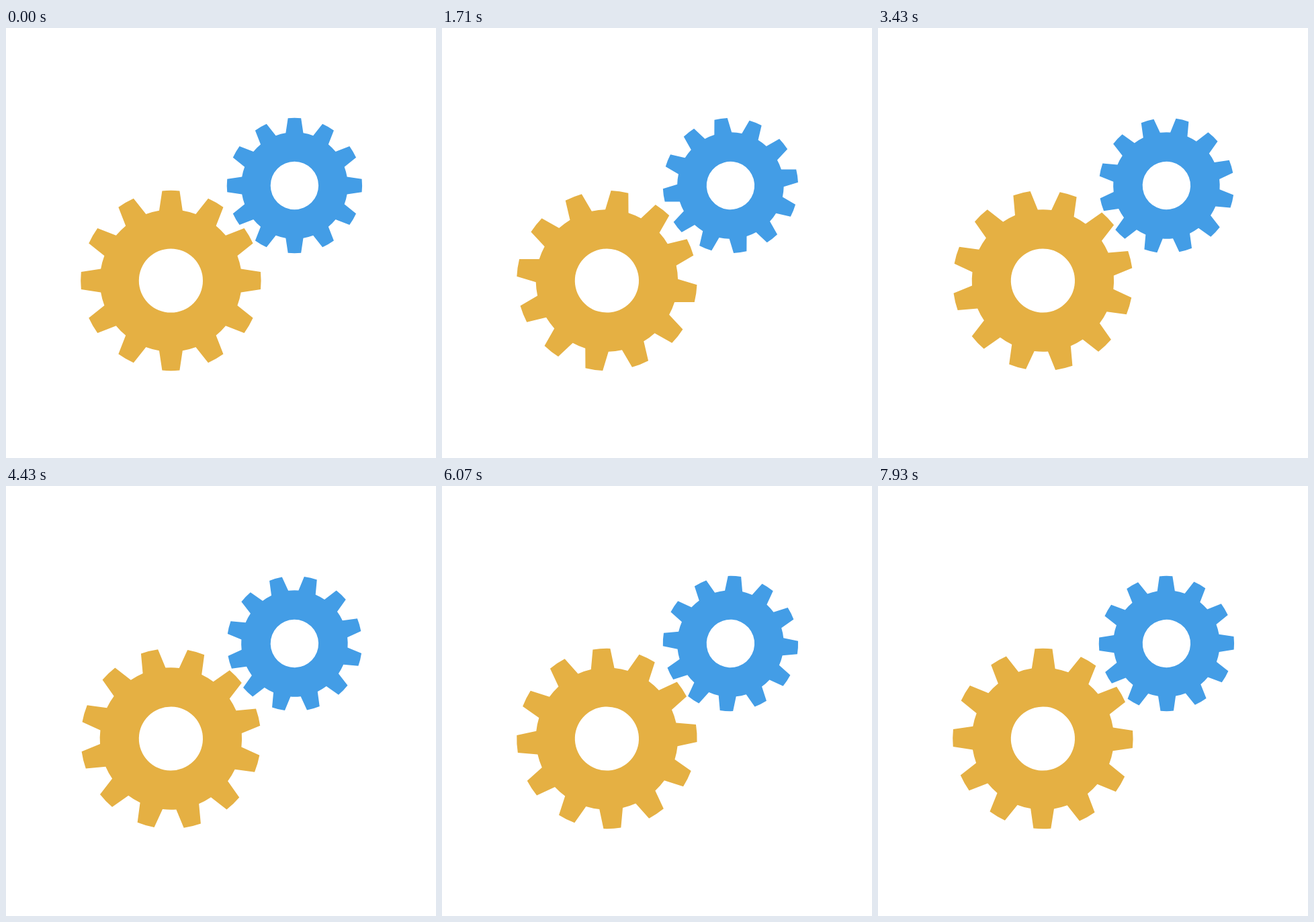
An HTML page with a canvas that plays this animation: 640 by 640 pixels, repeating every 8000 ms.

```html
<!DOCTYPE html>
<html lang="en">
<head>
<meta charset="utf-8">
<title>Gears</title>
<style>
  html, body { margin: 0; width: 100%; height: 100%; overflow: hidden; background: #fff; }
  canvas { display: block; width: 640px; height: 640px; }
</style>
</head>
<body>
<canvas id="stage" width="640" height="640"></canvas>
<script>
const ctx = document.getElementById('stage').getContext('2d');
const LOOP = 8000;
const FPS = 14;
const TEETH = 12;
const RAD = Math.PI / 180;
const STEP_ANGLE = 2.158 * RAD;

// Radii and half tooth angles of a gear at scale 1
const OUTER = 134.2, BODY = 105.7, HOLE = 47.6;
const TIP = 5.56 * RAD, BASE = 9.48 * RAD;

const gears = [
  { x: 245.4, y: 376, scale: 1, dir: -1, color: '#e5b043' },
  { x: 429.4, y: 234.5, scale: 0.75, dir: 1, color: '#439de6' }
];

function gearPath() {
  const path = new Path2D();
  const pitch = 2 * Math.PI / TEETH;
  for (let i = 0; i < TEETH; i++) {
    const mid = i * pitch - Math.PI / 2;
    path.arc(0, 0, OUTER, mid - TIP, mid + TIP);
    path.arc(0, 0, BODY, mid + BASE, mid + pitch - BASE);
  }
  path.closePath();
  path.moveTo(HOLE, 0);
  path.arc(0, 0, HOLE, 0, 2 * Math.PI);
  return path;
}

const shape = gearPath();

// Steps start on whole hundredths of a second
function stepAt(time) {
  const n = Math.round(time * FPS / 1000);
  return Math.round(n * 100 / FPS) * 10 > time ? n - 1 : n;
}

function draw(time) {
  const angle = stepAt(time % LOOP) * STEP_ANGLE;
  ctx.fillStyle = '#fff';
  ctx.fillRect(0, 0, 640, 640);
  for (const g of gears) {
    ctx.save();
    ctx.translate(g.x, g.y);
    ctx.scale(g.scale, g.scale);
    ctx.rotate(g.dir * angle);
    ctx.fillStyle = g.color;
    ctx.fill(shape, 'evenodd');
    ctx.restore();
  }
}

function tick() {
  draw(performance.now());
  requestAnimationFrame(tick);
}

tick();
</script>
</body>
</html>
```
